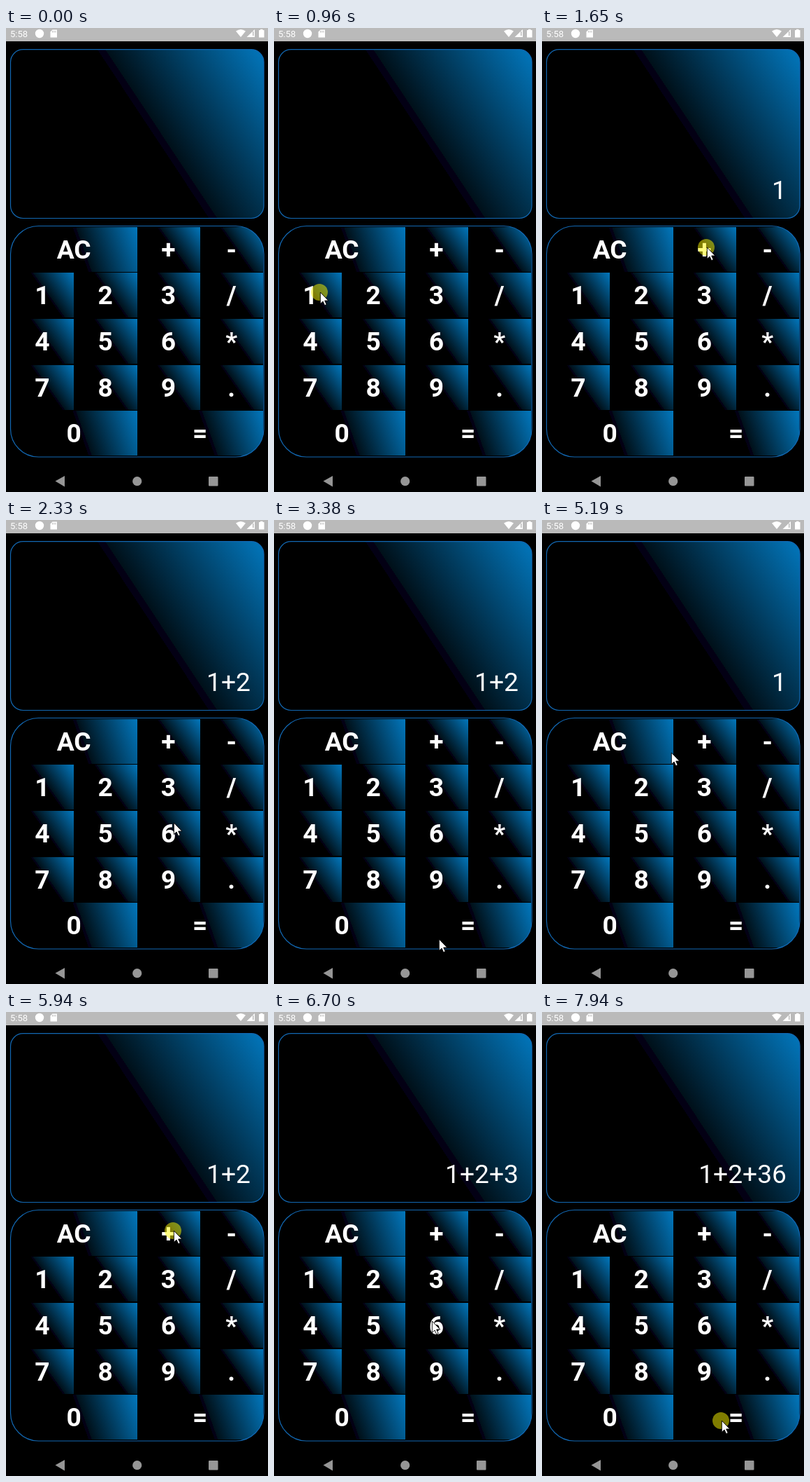
Write an HTML page with a canvas that moves like this. It is 375 by 662 pixels and loops after 8000 ms.

```html
<!DOCTYPE html>
<html lang="en">
<head>
<meta charset="utf-8">
<title>Calculator</title>
<style>
html, body { margin: 0; width: 100%; height: 100%; overflow: hidden; background: #000; }
canvas { display: block; width: 375px; height: 662px; }
</style>
</head>
<body>
<canvas id="stage" width="375" height="662"></canvas>
<script>
const ctx = document.getElementById('stage').getContext('2d');
const LOOP = 8000;
const PRESS_MS = 70;      // how long the touch mark shows
const READOUT_MS = 140;   // from touch to new readout
const LINGER_MS = 150;    // rest after a touch
const SETTLE_MS = 60;     // rest before a touch
const TRAVEL_MS = 600;    // longest move

// Where the pointer goes: time, x, y and the key touched there, if any
const stops = [
  [70, 306, 648], [960, 65, 377, '1'], [1600, 235, 313, '+'], [1990, 159, 384, '2'],
  [2330, 239, 432], [2540, 242, 443], [2700, 265, 356], [3450, 235, 598, '='],
  [4350, 123, 305, 'AC'], [4900, 62, 376, '1'], [5330, 235, 313, '+'], [5640, 150, 388, '2'],
  [5940, 239, 312, '+'], [6290, 238, 380, '3'], [6570, 225, 441, '6'],
  [7390, 225, 442], [7900, 256, 583, '=']
].map(([time, x, y, key]) => ({
  time, x, y, key,
  arrive: key ? time - SETTLE_MS : time,
  leave: key ? time + LINGER_MS : time
}));

const keys = [{ text: 'AC', col: 0, row: 0, span: 2 }, { text: '+', col: 2, row: 0, span: 1 },
  { text: '-', col: 3, row: 0, span: 1 }];
['123/', '456*', '789.'].forEach((line, i) =>
  [...line].forEach((text, col) => keys.push({ text, col, row: i + 1, span: 1 })));
keys.push({ text: '0', col: 0, row: 4, span: 2 }, { text: '=', col: 2, row: 4, span: 2 });

function roundRect(x, y, w, h, r) {
  ctx.beginPath();
  ctx.roundRect(x, y, w, h, r);
}

function polygon(points, color) {
  ctx.beginPath();
  points.forEach(([x, y]) => ctx.lineTo(x, y));
  ctx.closePath();
  ctx.fillStyle = color;
  ctx.fill();
}

function rect(x, y, w, h, color) {
  ctx.fillStyle = color;
  ctx.fillRect(x, y, w, h);
}

function disc(x, y, r, color) {
  ctx.beginPath();
  ctx.arc(x, y, r, 0, Math.PI * 2);
  ctx.fillStyle = color;
  ctx.fill();
}

function label(text, x, y, font, align) {
  ctx.font = font + ' Roboto, sans-serif';
  ctx.textAlign = align;
  ctx.fillStyle = '#fff';
  ctx.fillText(text, x, y);
}

// Black to blue, running from the bottom left corner to the top right one
function sheen(x, y, w, h) {
  const g = ctx.createLinearGradient(x, y + h, x + w, y);
  g.addColorStop(0.544, '#000');
  g.addColorStop(0.544, '#030014');
  g.addColorStop(0.566, '#030014');
  g.addColorStop(0.566, '#001019');
  g.addColorStop(1, '#0277bd');
  return g;
}

function outline() {
  ctx.strokeStyle = '#1268b3';
  ctx.lineWidth = 1.2;
  ctx.stroke();
}

function drawStatusBar() {
  const grey = '#bababa';
  rect(0, 0, 375, 19, grey);
  label('5:58', 6, 13, '13px', 'left');
  disc(48, 8, 6.2, '#fff');
  polygon([[66.5, 2.5], [73, 2.5], [73, 13.5], [63.5, 13.5], [63.5, 5.5]], '#fff');
  for (let i = 0; i < 3; i++) rect(66 + i * 2.2, 4, 1, 2.5, grey);
  ctx.beginPath();
  ctx.moveTo(336, 13);
  ctx.lineTo(329, 4.5);
  ctx.quadraticCurveTo(336, -0.5, 343, 4.5);
  ctx.fillStyle = '#fff';
  ctx.fill();
  polygon([[344.5, 13], [356, 13], [356, 2]], '#fff');
  rect(353, 5, 1.5, 6, grey);
  rect(362, 3, 7.5, 10.5, '#fff');
  rect(364, 1.8, 3.5, 2, '#fff');
}

function drawDisplay(text) {
  roundRect(6.5, 30.7, 362.5, 240.8, 18);
  ctx.fillStyle = sheen(6.5, 30.7, 362.5, 240.8);
  ctx.fill();
  outline();
  label(text, 350, 243.5, '37.2px', 'right');
}

function drawKeypad() {
  const pitch = 90.25;
  const top = row => Math.floor(284.3 + row * 65.6);
  const panel = () => roundRect(6.5, 282.5, 362.5, 329.5, 40);
  ctx.save();
  panel();
  ctx.clip();
  for (const { col, row, span } of keys) {
    const x = Math.round(8.3 + col * pitch);
    const w = Math.round(7.05 + (col + span) * pitch) - x;
    ctx.fillStyle = sheen(x, top(row), w, 64);
    ctx.fillRect(x, top(row), w, 64);
  }
  ctx.restore();
  panel();
  outline();
  for (const { text, col, row, span } of keys) {
    label(text, 6.9 + (col + span / 2) * pitch, top(row) + 45, 'bold 37.2px', 'center');
  }
}

function drawNavBar() {
  const grey = '#969696';
  polygon([[70.5, 646.5], [84, 639], [84, 654.5]], grey);
  disc(187.7, 646.7, 6.6, grey);
  roundRect(290, 640, 13.5, 13.5, 1);
  ctx.fillStyle = grey;
  ctx.fill();
}

function pointerAt(t) {
  const i = stops.findLastIndex(s => s.leave <= t);
  const from = stops[i], to = stops[i + 1] || from;
  const travel = Math.min(TRAVEL_MS, to.arrive - from.leave);
  const p = travel > 0 ? Math.min(1, (t - from.leave) / travel) : 1;
  const k = p * p * (3 - 2 * p);
  return [from.x + (to.x - from.x) * k, from.y + (to.y - from.y) * k].map(Math.round);
}

function readoutAt(t) {
  return stops.filter(s => s.key && s.time + READOUT_MS <= t).reduce((text, { key }) => {
    if (key === 'AC') return '';
    if (key === '=') return String(text.split('+').reduce((sum, n) => sum + Number(n), 0));
    return text + key;
  }, '');
}

function drawPointer(t) {
  if (t < stops[0].time) return;
  const [x, y] = pointerAt(t);
  if (stops.some(s => s.key && t >= s.time && t < s.time + PRESS_MS)) {
    disc(x, y, 12, 'rgba(255, 250, 0, 0.5)');
  }
  ctx.save();
  ctx.translate(x + 1, y);
  polygon([[0.3, 0], [0.3, 16.5], [4, 13], [6.6, 18.7], [9.2, 17.6], [6.7, 12], [11.8, 12]], '#fff');
  ctx.strokeStyle = '#000';
  ctx.lineWidth = 0.9;
  ctx.stroke();
  ctx.restore();
}

function draw(t) {
  rect(0, 0, 375, 662, '#000');
  drawStatusBar();
  drawDisplay(readoutAt(t));
  drawKeypad();
  drawNavBar();
  drawPointer(t);
}

const start = performance.now();
function tick() {
  draw((performance.now() - start) % LOOP);
  requestAnimationFrame(tick);
}
tick();
</script>
</body>
</html>
```
